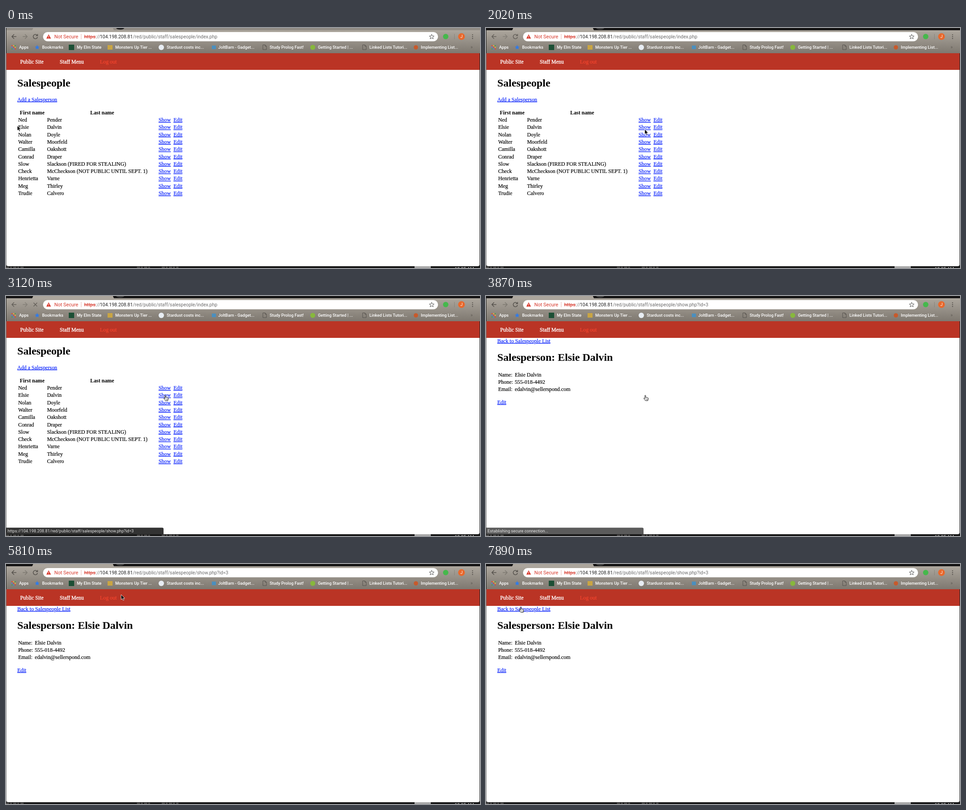
An HTML page that plays this animation: 1050 by 533 pixels, repeating every 8000 ms.

```html
<!DOCTYPE html>
<html lang="en">
<head>
<meta charset="utf-8">
<title>Salespeople</title>
<style>
html, body { margin: 0; width: 100%; height: 100%; overflow: hidden; background: #fff; }
svg { display: block; width: 100vw; height: 100vh; }
text { white-space: pre; }
.page { font: 11.87px "Liberation Serif", serif; --ink: #000; }
.page text { fill: var(--ink); stroke: var(--ink); stroke-width: .2; }
.page .h1 { font-size: 23.75px; font-weight: bold; stroke: none; }
.page .th { font-weight: bold; text-anchor: middle; stroke: none; }
.page .link { --ink: #0b24fb; text-decoration: underline; }
.page .menu { --ink: #fff; stroke-width: .35; }
.page .logout { --ink: #f7462f; }
.bar { font: 10.45px Roboto, sans-serif; }
.marks { font: 500 9.25px Roboto, sans-serif; fill: #fff; }
.status { font: 9.18px Roboto, sans-serif; fill: #e4e4e4; }
.line { fill: none; stroke: #55514c; stroke-width: 1.5; }
</style>
</head>
<body>
<svg viewBox="0 0 1050 533">
  <defs>
    <linearGradient id="metal" x2="0" y2="1">
      <stop stop-color="#aca69d"/><stop offset="1" stop-color="#7e7870"/>
    </linearGradient>
    <path id="doc" d="M0 0H5L8 3V10.5H0ZM5 0V3H8" fill="none" stroke="#55514c"/>
    <path id="star" d="M0-5.4 1.6-1.8 5.3-1.6 2.4.8 3.4 4.6 0 2.4-3.4 4.6-2.4.8-5.3-1.6-1.6-1.8Z"/>
  </defs>

  <!-- desktop edges -->
  <rect width="1050" height="533" fill="#191919"/>
  <path d="M.5 56V529" stroke="#777"/>
  <path d="M0 531.5H40M290 531.5H322M345 531.5H382" stroke="#4b4a4a" stroke-width="3" stroke-dasharray="7 2 4 3"/>
  <rect x="905" y="529" width="36" height="6" fill="#aaa"/>
  <text x="994" y="538.5" font-family="Roboto, sans-serif" font-size="10" fill="#ddd">10:05 AM</text>

  <!-- window -->
  <path d="M1 50H1049V525Q1049 529 1045 529H5Q1 529 1 525Z" fill="#fff"/>
  <rect id="strip" x="1" width="1049" height="7"/>
  <path d="M56 6Q59 5 60 0H237Q238 5 241 6Z" fill="#aca69d"/>
  <ellipse id="newTab" cx="253" cy="0" rx="9" ry="3.5"/>
  <path d="M1 5H1050V56H1Z" fill="url(#metal)"/>

  <g id="nav" class="line">
    <path d="M23 19H13M18 14 13 19 18 24"/>
    <path d="M37 19H47M42 14 47 19 42 24" opacity=".45"/>
    <path id="reload" d="M69 16.2A4.8 4.8 0 1 0 69.8 20M70 13.5V17H66.3"/>
    <path id="stop" d="M61 15 69 23M69 15 61 23"/>
  </g>
  <rect x="82" y="9" width="875" height="20.5" rx="10.2" fill="#fff"/>
  <path d="M94.5 14 99.7 23.5H89.3Z" fill="#d7382b"/>
  <path d="M94.5 17V20.3M94.5 21.3V22.4" stroke="#fff"/>
  <g class="bar">
    <text x="107" y="23" font-size="10.8" fill="#d7382b">Not Secure</text>
    <path d="M166.5 13V25" stroke="#e2a19b" stroke-width=".8"/>
    <text x="173" y="23" font-size="11.1" fill="#d7382b"><tspan text-decoration="line-through">https</tspan><tspan fill="#777">://</tspan></text>
    <text x="208" y="23" fill="#222">104.198.208.81</text>
    <text id="path" x="281" y="23" fill="#6c6c6c"></text>
  </g>
  <use href="#star" x="943" y="19.5" fill="none" stroke="#555"/>
  <circle cx="974" cy="19" r="6" fill="#46b84c"/>
  <path d="M993.5 13V25" stroke="#827d75" stroke-width=".7"/>
  <circle cx="1009" cy="19" r="7.5" fill="#e8682c"/>
  <text x="1009" y="22.3" class="bar" text-anchor="middle" style="font-size:9px" fill="#fff">J</text>
  <path d="M1033.5 15v.1m0 4v.1m0 4v.1" stroke="#504c47" stroke-width="2.2" stroke-linecap="round"/>

  <g id="apps"></g>
  <use href="#star" x="69" y="43" fill="#2f7bea"/>
  <rect x="139" y="37" width="12" height="12" fill="#1c4f35"/>
  <rect x="225" y="38" width="11" height="10" fill="#c9a544"/>
  <circle cx="344" cy="43" r="6" fill="#e8edf3"/>
  <rect x="456" y="39" width="9" height="8" fill="#4b8fbe"/>
  <use href="#doc" x="569" y="37.5"/>
  <circle cx="679.5" cy="43" r="5.5" fill="#87b83c"/>
  <use href="#doc" x="790" y="37.5"/>
  <circle cx="908" cy="43" r="4.8" fill="#c75a2c"/>
  <g id="marks" class="marks"></g>
  <text x="1029" y="46" class="bar" fill="#615c55">»</text>

  <g class="page">
    <rect x="1" y="56" width="1049" height="37" fill="#ba3425"/>
    <text class="menu" x="31.5" y="79">Public Site</text>
    <text class="menu" x="119" y="79">Staff Menu</text>
    <text class="logout" x="208" y="79">Log out</text>
    <g id="list">
      <text class="h1" x="25" y="130">Salespeople</text>
      <text class="link" x="25" y="162.6">Add a Salesperson</text>
      <text class="th" x="58" y="192">First name</text>
      <text class="th" x="213" y="192">Last name</text>
    </g>
    <g id="detail">
      <text class="link" x="25" y="103.7">Back to Salespeople List</text>
      <text class="h1" x="25" y="143.5">Salesperson: Elsie Dalvin</text>
      <text class="link" x="25" y="239.7">Edit</text>
    </g>
  </g>
  <path d="M1049.5 56V529" stroke="#222"/>

  <g id="status" class="status">
    <path d="M0 514.5H346Q349 514.5 349 517.5V529H0Z" fill="#333"/>
    <text id="statusText" x="3.5" y="525"></text>
  </g>

  <g id="cursor">
    <path id="arrow" d="M0 0V11L2.6 8.7 4.4 12.8 6.3 12 4.5 8H8Z" stroke="#fff" stroke-width=".8"/>
    <g id="hand" fill="#fff" stroke="#000" stroke-width=".9">
      <path d="M2.8 1.5C2.8 0 4.8 0 4.8 1.5V5L8.5 5.6Q10.8 6 10.5 8L9.5 12.5H4.3L.8 8C0 6.8 1.3 6 2.1 6.8L3.3 8Z"/>
      <path d="M5.5 8.3V10.5M7.2 8.3V10.5M8.8 8.3V10.5" stroke-width=".6"/>
    </g>
    <path id="beam" d="M-2.5-6Q0-6 0-4V4Q0 6-2.5 6M2.5-6Q0-6 0-4V4Q0 6 2.5 6M-1.5 1H1.5" fill="none" stroke="#222"/>
  </g>
</svg>
<script>
const $ = id => document.getElementById(id);

function add(parent, tag, attrs, text = "") {
  const node = document.createElementNS("http://www.w3.org/2000/svg", tag);
  for (const key in attrs) node.setAttribute(key, attrs[key]);
  node.textContent = text;
  $(parent).append(node);
}
const label = (parent, x, y, text, cls = "") => add(parent, "text", { x, y, class: cls }, text);
const show = (id, on) => $(id).style.display = on ? "" : "none";

const people = `Ned,Pender
Elsie,Dalvin
Nolan,Doyle
Walter,Moorfeld
Camilla,Oakshott
Conrad,Draper
Slow,Slackson (FIRED FOR STEALING)
Check,McCheckson (NOT PUBLIC UNTIL SEPT. 1)
Henrietta,Varne
Meg,Thirley
Trudie,Calvero`.split("\n");
people.forEach((person, i) => {
  const [first, last] = person.split(","), y = 208 + i * 16.3;
  label("list", 27, y, first);
  label("list", 91, y, last);
  label("list", 338, y, "Show", "link");
  label("list", 371, y, "Edit", "link");
});

[["Name:", "Elsie Dalvin"], ["Phone:", "555-018-4492"], ["Email:", "edalvin@sellerspond.com"]]
  .forEach(([key, value], i) => {
    label("detail", 27, 178.5 + i * 16.3, key);
    label("detail", 63.7, 178.5 + i * 16.3, value);
  });

[[29, "Apps"], [80, "Bookmarks"], [157, "My Elm State"], [242, "Monsters Up Tier ..."],
 [356, "Stardust costs inc..."], [470, "JoltBarn - Gadget..."], [584, "Study Prolog Fast!"],
 [691, "Getting Started | ..."], [805, "Linked Lists Tutori..."], [919, "Implementing List..."]]
  .forEach(([x, text]) => label("marks", x, 46.2, text));

const appColors = ["#d84a3c", "#e0b23a", "#4d9b57", "#4a7fd0"];
for (let i = 0; i < 9; i++)
  add("apps", "rect", { x: 12 + i % 3 * 3.6, y: 38 + (i / 3 | 0) * 3.6, width: 2.6, height: 2.6, fill: appColors[i % 4] });

// Cursor moves: first step, last step (ms), then the position held at each step.
const moves = [
  [0, 0, [25, 217]],
  [150, 1130, [30, 203], [62, 190], [112, 183], [175, 188], [243, 200], [307, 211], [348, 244]],
  [1280, 1580, [349, 239], [350, 232], [351.5, 225]],
  [2380, 2380, [349, 220]],
  [4320, 5220, [325, 206], [265, 192], [180, 178], [100, 169], [52, 170], [56, 178], [62, 182]],
  [5370, 6410, [92, 165], [143, 132], [202, 97], [255, 68], [296, 50], [328, 38], [348, 30], [358, 26]],
  [6560, 7590, [410, 20], [465, 17], [505, 17], [514, 19], [480, 19], [375, 25], [240, 43], [128, 65]],
  [7740, 7890, [98, 84], [73, 95]],
];

function cursorAt(t) {
  const [start, end, ...points] = moves.findLast(move => t >= move[0]);
  const last = points.length - 1;
  const step = last ? Math.floor((t - start + 5) / (end - start) * last) : 0;
  return points[Math.min(step, last)];
}

const site = "/red/public/staff/salespeople/";
const showPage = site + "show.php?id=3";

function statusOpacity(t) {
  if (t < 2520 || t >= 4020) return 0;
  if (t < 2820) return t < 2670 ? .35 : .75;
  return t < 3870 ? 1 : .8;
}

function draw(t) {
  const loaded = t >= 3570, loading = t >= 3120 && !loaded;
  show("list", !loaded);
  show("detail", loaded);
  show("stop", loading);
  show("reload", !loading);
  $("path").textContent = loaded ? showPage : site + "index.php";

  $("strip").setAttribute("fill", t < 1880 ? "#918c85" : t < 2020 ? "#4a4743" : "#151414");
  $("newTab").setAttribute("fill", t < 1880 ? "#222" : "#444");
  $("nav").setAttribute("opacity", t >= 2020 && !loaded ? .8 : 1);

  $("status").setAttribute("opacity", statusOpacity(t));
  $("statusText").textContent = loaded ? "Establishing secure connection..." : "https://104.198.208.81" + showPage;

  const [x, y] = cursorAt(t);
  const hand = t >= 2380 && t < 4320 || t >= 7890;
  const beam = !hand && y < 26;
  $("cursor").setAttribute("transform", `translate(${x} ${y})`);
  show("hand", hand);
  show("beam", beam);
  show("arrow", !hand && !beam);
}

const began = performance.now();
function frame() {
  draw((performance.now() - began) % 8000);
  requestAnimationFrame(frame);
}
frame();
</script>
</body>
</html>
```
